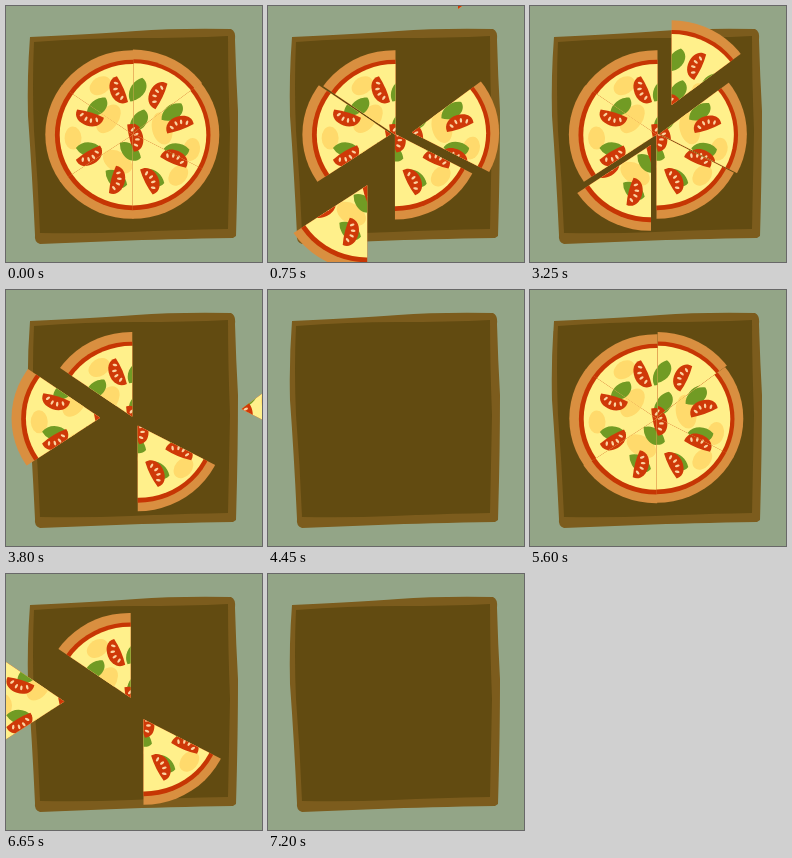
An HTML page that plays this animation: 256 by 256 pixels, repeating every 8000 ms.

```html
<!DOCTYPE html>
<html lang="en">
<head>
<meta charset="utf-8">
<title>Pizza slices</title>
<style>
html, body { margin: 0; width: 100%; height: 100%; overflow: hidden; background: #93a587; }
svg { display: block; width: 100%; height: 100%; }
</style>
</head>
<body>
<svg viewBox="0 0 256 256">
  <defs>
    <g id="tomato">
      <path fill="#cf3908" d="M-14 -5Q0 -8 14 -6C15 2 8 7 0 7S-15 3 -14 -5Z"/>
    </g>
    <path id="leaf" fill="#719b24" d="M-13 2C-9 -7 3 -10 12 -4C13 5 3 9 -4 7Q-9 6 -13 2Z"/>
    <g id="pizza">
      <ellipse cx="126.3" cy="128.5" rx="87" ry="84.3" fill="#d98f40"/>
      <ellipse cx="126.7" cy="129" rx="77.8" ry="75.2" fill="#c63604"/>
      <ellipse cx="127" cy="128.7" rx="73.3" ry="70.7" fill="#fff08b"/>
      <g id="toppings"></g>
    </g>
  </defs>
  <rect width="256" height="256" fill="#93a587"/>
  <path fill="#7c5c1d" d="M24 31Q90 28 130 25T225 23Q230 25 229 34Q230 70 232 105Q232 160 230 230L227 232Q160 233 110 235L34 238Q28 236 29 229Q26 165 22 110Q21 70 24 31Z"/>
  <path fill="#624b11" d="M28 36Q80 32 130 32T222 30Q222 75 224 125Q223 175 222 223Q170 224 125 226T34 227Q32 175 28 125Q26 80 28 36Z"/>
  <g id="slices"></g>
</svg>
<script>
const LOOP = 8000, CYCLE = 2730, STEP = 30;
const CENTER = { x: 127, y: 128 };
const TOPPING_CENTER = { x: 127, y: 130 };

const byId = id => document.getElementById(id);

function add(parent, tag, attrs) {
  const el = document.createElementNS('http://www.w3.org/2000/svg', tag);
  for (const key in attrs) el.setAttribute(key, attrs[key]);
  return parent.appendChild(el);
}

function polar(origin, radius, degrees) {
  const a = degrees * Math.PI / 180;
  return { x: origin.x + radius * Math.cos(a), y: origin.y + radius * Math.sin(a) };
}

const sine = degrees => Math.sin(degrees * Math.PI / 180);
const toppings = byId('toppings');

function put(id, { x, y }, turn) {
  add(toppings, 'use', { href: '#' + id, transform: `translate(${x} ${y}) rotate(${turn})` });
}

// Evenly spaced, with a slight hand-placed unevenness
function ring(id, count, radius, start, turnAt) {
  for (let i = 0; i < count; i++) {
    const even = start + i * 360 / count;
    const angle = even - 3 + 6 * sine(even + 125);
    put(id, polar(TOPPING_CENTER, radius, angle), turnAt(angle));
  }
}

// Melted patches lie along the tangent
function patches(angles, radius, rx, ry) {
  for (const angle of angles) {
    const { x, y } = polar(TOPPING_CENTER, radius, angle);
    add(toppings, 'ellipse', { rx, ry, fill: '#ffda6c', transform: `translate(${x} ${y}) rotate(${angle})` });
  }
}

for (let k = -1.5; k <= 1.5; k++) {
  add(byId('tomato'), 'ellipse', {
    rx: 1.2, ry: 2.4, fill: '#fbd3a0',
    transform: `translate(${k * 5.3} ${1.2 - k * k * 1.3}) rotate(${-k * 23})`
  });
}

patches([13, 41, 178, 237], 60, 8.5, 11.5);
patches([121, 215, 346], 30, 10, 16);

const leafTurn = angle => 50 * sine(angle);
ring('leaf', 7, 46, 223, leafTurn);
ring('leaf', 2, 15.5, 289, leafTurn);
ring('tomato', 8, 47.5, 252, angle => angle + 178);
put('tomato', { x: 130, y: 131 }, -102);

// Slices leave one after another, each along the middle of its wedge
const cuts = [-90, -36.5, 27, 90, 147, 214, 270];
const departure = [0, 3, 1, 4, 2, 5];

const slices = departure.map((wedge, order) => {
  const from = cuts[wedge], to = cuts[wedge + 1], middle = (from + to) / 2;
  // A tip set slightly back makes neighbours overlap, which hides the seams
  const tip = polar(CENTER, -1, middle);
  const corners = [tip, ...[from, middle, to].map(angle => polar(tip, 130, angle))];
  const clip = add(document.querySelector('defs'), 'clipPath', { id: 'wedge' + wedge });
  add(clip, 'polygon', { points: corners.map(p => `${p.x},${p.y}`).join(' ') });
  const el = add(byId('slices'), 'g', {});
  add(el, 'use', { href: '#pizza', 'clip-path': `url(#wedge${wedge})` });
  return { el, middle, delay: Math.max(0, 6.55 * order - 1.7) };
});

function draw(time) {
  const step = Math.floor(time % LOOP % CYCLE / STEP);
  for (const { el, middle, delay } of slices) {
    const distance = Math.max(0, 142 * Math.exp(0.177 * (step - 25 - delay)) - 1);
    const { x, y } = polar({ x: 0, y: 0 }, Math.min(distance, 400), middle);
    el.setAttribute('transform', `translate(${x.toFixed(2)} ${y.toFixed(2)})`);
  }
}

const start = performance.now();
function tick() {
  draw(performance.now() - start);
  requestAnimationFrame(tick);
}
tick();
</script>
</body>
</html>
```
